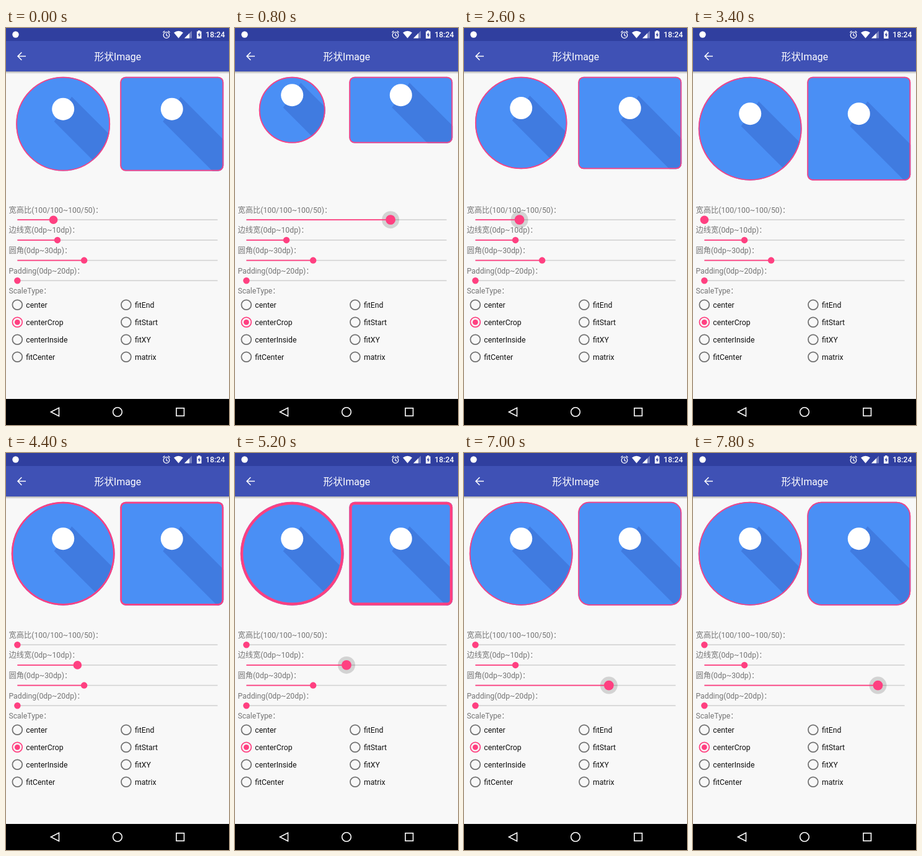
Animation of 360 by 640 pixels, one loop 8000 ms. Source, as an HTML page:

```html
<!DOCTYPE html>
<html lang="zh-CN">
<head>
<meta charset="utf-8">
<title>形状Image</title>
<style>
  html, body { margin: 0; width: 100%; height: 100%; overflow: hidden; background: #f8f8f8; }
  svg { display: block; width: 360px; height: 640px; }
  text { font: 12.27px Roboto, "Noto Sans CJK SC", "Noto Sans CJK", sans-serif; white-space: pre; }
  .line { fill: none; stroke: #fff; stroke-width: 1.6; }
  .border { fill: none; stroke: #ff4081; }
</style>
</head>
<body>
<svg viewBox="0 0 360 640">
  <defs>
    <linearGradient id="fade" x2="0" y2="1">
      <stop stop-color="#000" stop-opacity=".3"/>
      <stop offset="1" stop-color="#000" stop-opacity="0"/>
    </linearGradient>
    <clipPath id="roundClip"><circle id="roundShape"/></clipPath>
    <clipPath id="rectClip"><rect id="rectShape"/></clipPath>
    <g id="art">
      <rect x="-90" y="-90" width="180" height="220" fill="#4a8ff5"/>
      <path d="M14 -20L214 180L185.500 220L-14.500 20Z" fill="#407be0"/>
      <circle r="18" fill="#fff"/>
    </g>
  </defs>

  <rect width="360" height="640" fill="#f8f8f8"/>
  <rect y="70" width="360" height="4" fill="url(#fade)"/>
  <rect width="360" height="70" fill="#3f51b5"/>
  <rect width="360" height="21" fill="#303f9f"/>

  <g fill="#fff">
    <circle cx="15.500" cy="10.500" r="5.200"/>
    <path d="M271 7.500Q278.500 2 286 7.500L278.500 16.500Z"/>
    <path d="M300 4.500V16.500H288Z" opacity=".35"/>
    <path d="M296 8.500V16.500H288Z"/>
    <path d="M308 5.500H310V4H313.500V5.500H315.500V17H308Z"/>
    <path d="M312.500 7L309.500 11.500H311.400V15L314.200 10.400H312.500Z" fill="#303f9f"/>
    <text x="353.500" y="15.300" text-anchor="end" style="font-weight:500">18:24</text>
    <text x="180.300" y="51.800" text-anchor="middle" style="font-size:15.770px">形状Image</text>
  </g>
  <g class="line" style="stroke-width:1.300">
    <circle cx="259" cy="11.500" r="4.800"/>
    <path d="M259 8.500V11.800L261.300 13.200M253.400 7.200L256.300 4.700M264.600 7.200L261.700 4.700"/>
  </g>
  <path class="line" d="M32 45.500H19.500M25.300 39.300L19.100 45.500L25.300 51.700"/>

  <g clip-path="url(#roundClip)"><use id="roundArt" href="#art"/></g>
  <g clip-path="url(#rectClip)"><use id="rectArt" href="#art"/></g>
  <circle id="roundBorder" class="border"/>
  <rect id="rectBorder" class="border"/>

  <g id="form"></g>

  <rect y="598" width="360" height="42"/>
  <g class="line">
    <path d="M85.500 612.300V625.700L72.500 619Z"/>
    <circle cx="180" cy="619" r="7.300"/>
    <rect x="275" y="612.800" width="12.500" height="12.500"/>
  </g>
</svg>

<script>
const LOOP = 8000, STEP = 200;
const DP = 360 / 411;                 // screen density
const SIDE = 10 * DP, TOP = 70 + SIDE, SIZE = 166.87;
const TRACK_X = 18.4, TRACK_W = 323.2;
const PINK = '#ff4081';

// keys: [time, value]; press: [start, end] of the touch
const sliders = [
  { label: '宽高比(100/100~100/50)：', max: 50, press: [0, 3400],
    keys: [[0, 9], [800, 36], [1000, 39], [1600, 13], [2600, 11], [3200, 0]] },
  { label: '边线宽(0dp~10dp)：', max: 10, press: [4400, 5800],
    keys: [[4200, 2], [4400, 3], [5000, 7], [5600, 2]] },
  { label: '圆角(0dp~30dp)：', max: 30, press: [6300, 9000],
    keys: [[6000, 10], [6200, 13], [7800, 26]] },
  { label: 'Padding(0dp~20dp)：', max: 20, press: [-1, -1], keys: [[0, 0]] }
];
const scaleTypes = [
  ['center', 'centerCrop', 'centerInside', 'fitCenter'],
  ['fitEnd', 'fitStart', 'fitXY', 'matrix']
];

const $ = id => document.getElementById(id);
const set = (node, attrs) => {
  for (const name in attrs) node.setAttribute(name, attrs[name]);
  return node;
};
const add = (tag, attrs, text = '') => {
  const node = document.createElementNS('http://www.w3.org/2000/svg', tag);
  node.textContent = text;
  return $('form').appendChild(set(node, attrs));
};
const addLabel = (row, text) =>
  add('text', { x: 4.4, y: 297.5 + 32.7 * row, fill: '#757575' }, text);

sliders.forEach((slider, row) => {
  const cy = 309.2 + 32.7 * row;
  addLabel(row, slider.label);
  add('rect', { x: TRACK_X, y: cy - .8, width: TRACK_W, height: 1.6, fill: '#d2d2d2' });
  slider.halo = add('circle', { cy, r: 14, fill: '#000', 'fill-opacity': .15 });
  slider.bar = add('rect', { x: TRACK_X, y: cy - .9, height: 1.8, fill: PINK });
  slider.thumb = add('circle', { cy, fill: PINK });
});
addLabel(4, 'ScaleType：');

scaleTypes.forEach((names, column) => names.forEach((name, row) => {
  const cx = 18.3 + 175.6 * column, cy = 446.3 + 28 * row;
  const checked = name === 'centerCrop';
  add('circle', { cx, cy, r: 7.9, fill: 'none', 'stroke-width': 1.75, stroke: checked ? PINK : '#707070' });
  if (checked) add('circle', { cx, cy, r: 4.4, fill: PINK });
  add('text', { x: cx + 14, y: cy + 4.4, fill: '#111' }, name);
}));

function valueAt(keys, t) {
  const next = keys.findIndex(key => key[0] > t);
  if (next === 0) return keys[0][1];
  if (next < 0) return keys[keys.length - 1][1];
  const [t0, v0] = keys[next - 1], [t1, v1] = keys[next];
  return Math.round(v0 + (v1 - v0) * (t - t0) / (t1 - t0));
}

function drawSlider({ keys, max, press: [start, end], halo, bar, thumb }, t) {
  const value = valueAt(keys, t), width = TRACK_W * value / max, cx = TRACK_X + width;
  const held = t > start && t < end;
  const changing = t === start || t === end;
  set(bar, { width });
  set(thumb, { cx, r: held ? 7.9 : changing ? 6.8 : 5.25 });
  set(halo, { cx, visibility: held ? 'visible' : 'hidden' });
  return value;
}

function drawImages(ratio, borderDp, cornerDp) {
  const height = SIZE * (1 - ratio / 100), radius = height / 2;
  const cx = SIDE + SIZE / 2, cy = TOP + radius;
  const x = 360 - SIDE - SIZE, stroke = borderDp * DP, corner = cornerDp * DP;
  const markY = cy - 24;

  set($('roundArt'), { transform: `translate(${cx} ${markY})` });
  set($('rectArt'), { transform: `translate(${x + SIZE / 2} ${markY})` });
  set($('roundShape'), { cx, cy, r: radius });
  set($('rectShape'), { x, y: TOP, width: SIZE, height, rx: corner });
  set($('roundBorder'), { cx, cy, r: radius - stroke / 2, 'stroke-width': stroke });
  set($('rectBorder'), {
    x: x + stroke / 2, y: TOP + stroke / 2, width: SIZE - stroke, height: height - stroke,
    rx: Math.max(0, corner - stroke / 2), 'stroke-width': stroke
  });
}

const began = performance.now();
function frame() {
  const elapsed = (performance.now() - began) % LOOP;
  const t = Math.floor(elapsed / STEP) * STEP;
  drawImages(...sliders.map(slider => drawSlider(slider, t)));
  requestAnimationFrame(frame);
}
frame();
</script>
</body>
</html>
```
